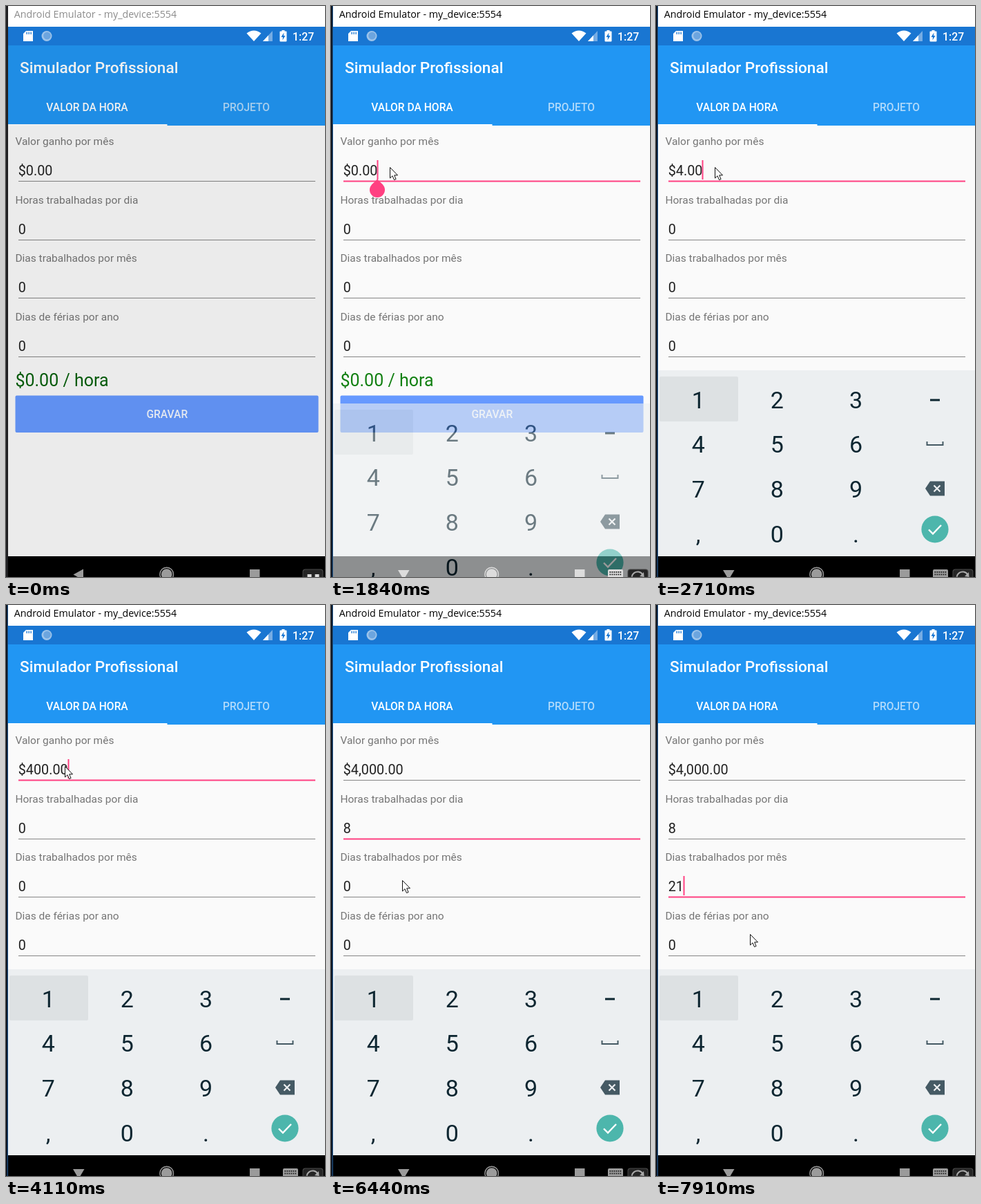
Animation, 462 px wide and 826 px high, one loop 8 s. Source, as an HTML page with a canvas:

```html
<!DOCTYPE html>
<html lang="pt">
<head>
<meta charset="utf-8">
<title>Simulador</title>
<style>
  html, body { margin: 0; width: 100%; height: 100%; overflow: hidden; background: #000; }
  canvas { display: block; width: 462px; height: 826px; }
</style>
</head>
<body>
<canvas id="stage" width="462" height="826"></canvas>
<script>
const W = 462, H = 826, LOOP = 8000, STEP = 77.5, BLINK = 500, PITCH = 84.7;
const ACTIVE_AT = 1100, SLIDE_AT = 1740, SLIDE = 200, NAV_Y = 796;
const PINK = '#ff4081', ROBOTO = 'Roboto, sans-serif', FIELD_SIZE = 19.8, FIELD_X = 17.7;
let ctx = document.getElementById('stage').getContext('2d');

// focus: when the field is tapped; keys: when each character is typed
const FIELDS = [
  { label: 'Valor ganho por mês', focus: 1620, typed: '400000', money: true,
    keys: [2390, 2540, 2710, 2940, 3090, 4250] },
  { label: 'Horas trabalhadas por dia', focus: 5570, typed: '8', keys: [5930] },
  { label: 'Dias trabalhados por mês', focus: 6860, typed: '21', keys: [7590, 7720] },
  { label: 'Dias de férias por ano', focus: Infinity, typed: '', keys: [] }
];
const EVENTS = FIELDS.flatMap(f => [f.focus, ...f.keys]).concat(SLIDE_AT + SLIDE);

const ENTER = { t: 230, x: 228, y: 607 };
const MOVES = [
  { from: 230, to: 610, x: 57, y: 248 },
  { from: 720, to: 920, x: 46, y: 240 },
  { from: 1030, to: 1240, x: 85, y: 233 },
  { from: 4600, to: 5270, x: 87, y: 319 },
  { from: 6020, to: 6430, x: 103, y: 398 },
  { from: 7640, to: 7900, x: 136, y: 476 }
];

const clamp = v => Math.max(0, Math.min(1, v));
const easeOut = p => p * (2 - p);
const rowShift = i => Math.round(i * PITCH);

function valueOf(field, t) {
  const typed = field.typed.slice(0, field.keys.filter(k => k <= t).length);
  if (!field.money) return typed || '0';
  return '$' + (typed / 100).toLocaleString('en-US', { minimumFractionDigits: 2 });
}

function caretOn(t) {
  const last = Math.max(...EVENTS.filter(e => e <= t));
  return Math.floor((t - last) / BLINK) % 2 === 0;
}

function pointerAt(t) {
  let { x, y } = ENTER;
  for (const m of MOVES) {
    const p = easeOut(clamp((t - m.from) / (m.to - m.from)));
    x += (m.x - x) * p;
    y += (m.y - y) * p;
  }
  return [Math.round(x), Math.round(y)];
}

function rect(x, y, w, h, color) {
  ctx.fillStyle = color;
  ctx.fillRect(x, y, w, h);
}

function round(x, y, w, h, r, color) {
  ctx.fillStyle = color;
  ctx.beginPath();
  ctx.roundRect(x, y, w, h, r);
  ctx.fill();
}

function disc(x, y, r, color) {
  ctx.fillStyle = color;
  ctx.beginPath();
  ctx.arc(x, y, r, 0, 7);
  ctx.fill();
}

function arc(x, y, r, from, to, color, width) {
  ctx.strokeStyle = color;
  ctx.lineWidth = width;
  ctx.beginPath();
  ctx.arc(x, y, r, from, to);
  ctx.stroke();
}

function poly(points, color) {
  ctx.fillStyle = color;
  ctx.fill(new Path2D(`M${points}Z`));
}

function line(points, color, width) {
  ctx.strokeStyle = color;
  ctx.lineWidth = width;
  ctx.stroke(new Path2D(`M${points}`));
}

function text(s, x, y, size, color, weight = 400, align = 'left', family = ROBOTO) {
  ctx.font = `${weight} ${size}px ${family}`;
  ctx.textAlign = align;
  ctx.fillStyle = color;
  ctx.fillText(s, x, y);
}

function drawWindow(active) {
  rect(0, 0, W, H, '#fff');
  rect(0, 0, 3, H, active ? '#0b1524' : '#1f1f22');
  if (active) rect(2, 0, 1, H, '#20558a');
  text('Android Emulator - my_device:5554', 11.7, 17, 14.3,
    active ? '#000' : '#8c8c8c', 400, 'left', '"Open Sans", sans-serif');
}

function drawStatus() {
  const bar = '#1976d2';
  rect(3, 30, 459, 27, bar);
  poly('29 36H39V51H25V40', '#fff');
  for (let i = 0; i < 3; i++) rect(29.5 + i * 3, 37.5, 1.3, 3.5, bar);
  disc(59, 43.5, 7.5, '#9cc3ea');
  disc(59.5, 43, 5.3, '#6ca5df');
  poly('359 51L348.5 39.5Q359 31.5 369.5 39.5', '#fff');
  poly('386 36V51H372', 'rgba(255,255,255,.4)');
  poly('380 42.5V51H372', '#fff');
  rect(399.5, 35, 4, 2, '#fff');
  round(396.5, 36.5, 10, 15, 1, '#fff');
  poly('402.5 38.5L398.5 45H401L400.5 49.5L404.5 43H402', bar);
  text('1:27', 415, 49.5, 15.8, '#fff', 500);
}

function drawHeader() {
  rect(3, 57, 459, 116, '#2196f3');
  text('Simulador Profissional', 20, 96.5, 22.6, '#fff', 500);
  text('VALOR DA HORA', 117.5, 152, 15.6, '#fff', 500, 'center');
  text('PROJETO', 348, 152, 15.6, 'rgba(255,255,255,.65)', 500, 'center');
  rect(3, 171, 230.5, 2, '#fff');
}

function drawForm(t, focus) {
  rect(3, 173, 459, 623, '#fafafa');
  FIELDS.forEach((field, i) => {
    const y = rowShift(i);
    text(field.label, 13.4, 201 + y, 15.5, '#757575');
    text(valueOf(field, t), FIELD_X, 245 + y, FIELD_SIZE, '#212121');
    if (i === focus) rect(18, 252.5 + y, 430, 2, PINK);
    else rect(18, 253 + y, 430, 1, '#858585');
  });
  text('$0.00 / hora', 13.4, 550, 25, focus < 0 ? '#06600c' : '#128012');
  round(13.5, 563.5, 439, 53.5, 2, '#69f');
  text('GRAVAR', 233.3, 596, 15.6, 'rgba(255,255,255,.92)', 500, 'center');
}

function drawCaret(t, focus) {
  const field = FIELDS[focus], y = rowShift(focus);
  ctx.font = `400 ${FIELD_SIZE}px ${ROBOTO}`;
  const x = Math.round(FIELD_X + ctx.measureText(valueOf(field, t)).width);
  if (caretOn(t)) rect(x - .5, 223 + y, 2, 28, PINK);
  if (t < field.keys[0]) {
    disc(x, 266 + y, 11, PINK);
    poly(`${x} ${250.5 + y}l8 8h-16`, PINK);
  }
}

function drawKeys() {
  const bg = '#eceff1', ink = '#0d2631', icon = '#455a64';
  rect(3, 527, 459, 299, bg);
  round(5, 536, 114, 65, 2, '#dde1e3');
  [...'123456789,0.'].forEach((key, i) => {
    const row = Math.floor(i / 3);
    text(key, 61.2 + i % 3 * 114.2, Math.round(581.6 + row * 64.8), 34, ink, 400, 'center');
  });
  rect(397, 568.5, 14, 3, ink);
  line('392.5 630v5h23v-5', icon, 2);
  poly('390 698l7 -10.5h21v21h-21', icon);
  line('402.5 693.5l9 9m0 -9l-9 9', bg, 2.2);
  disc(404, 757, 19.6, '#4db6ac');
  line('395 757.5l6 6l12 -12.5', '#fff', 2.4);
}

// The keyboard is one flat sheet, so that it fades as a whole.
const sheet = document.createElement('canvas');
sheet.width = W;
sheet.height = H;
const stage = ctx;
ctx = sheet.getContext('2d');
drawKeys();
ctx = stage;

function drawKeyboard(p) {
  const shift = Math.round(119 * (1 - p));
  const h = p < 1 ? H - 527 - shift : NAV_Y - 527;
  ctx.globalAlpha = p;
  ctx.drawImage(sheet, 0, 527, W, h, 0, 527 + shift, W, h);
  ctx.globalAlpha = 1;
}

function drawNav(open, fading) {
  const tone = fading ? '#dcdcdc' : '#9b9b9b';
  poly(open ? '97 816h16.5l-8.3 14' : '97.5 822.5l14.5 -8v16', tone);
  disc(232.7, 822, 7.8, tone);
  arc(232.7, 822, 9.8, 0, 7, tone, 1.4);
  rect(353, 815, 14.5, 11, tone);
  round(429.5, 814.5, 30, 20, 4, '#484848');
  round(430.5, 815.5, 28, 20, 3.5, '#252525');
  if (open) {
    round(401, 815, 22, 14, 2, tone);
    for (let i = 0; i < 12; i++) {
      rect(403.5 + i % 6 * 3, 818 + Math.floor(i / 6) * 3.5, 1.7, 1.8, '#222');
    }
    arc(444, 827, 8.5, 3.3, 5.8, '#aaa', 2);
    poly('453 819l.5 7l-6.5 -1', '#aaa');
  } else {
    for (const x of [436.5, 447.5]) rect(x, 822, 6, 4, '#ddd');
  }
}

function drawPointer(x, y) {
  const shape = `${x + .5} ${y + .5}v15.5l3.5 -3.3l2.5 5.8l2.6 -1l-2.4 -5.7h4.8z`;
  poly(shape, '#fff');
  line(shape, '#111', 1);
}

function draw(t) {
  const focus = FIELDS.filter(f => f.focus <= t).length - 1;
  const slide = clamp((t - SLIDE_AT) / SLIDE);
  drawWindow(t >= ACTIVE_AT);
  drawStatus();
  drawHeader();
  drawForm(t, focus);
  if (focus < 0) rect(3, 57, 459, NAV_Y - 57, 'rgba(0,0,0,.06)');
  else drawCaret(t, focus);
  rect(3, NAV_Y, 459, 30, '#000');
  if (slide) drawKeyboard(slide);
  drawNav(slide > 0, slide > 0 && slide < 1);
  if (t >= ENTER.t) drawPointer(...pointerAt(t));
}

// The screen refreshes in even steps.
const begin = performance.now();
function tick() {
  const t = (performance.now() - begin) % LOOP;
  draw(Math.floor((t + 25) / STEP) * STEP);
  requestAnimationFrame(tick);
}
tick();
</script>
</body>
</html>
```
